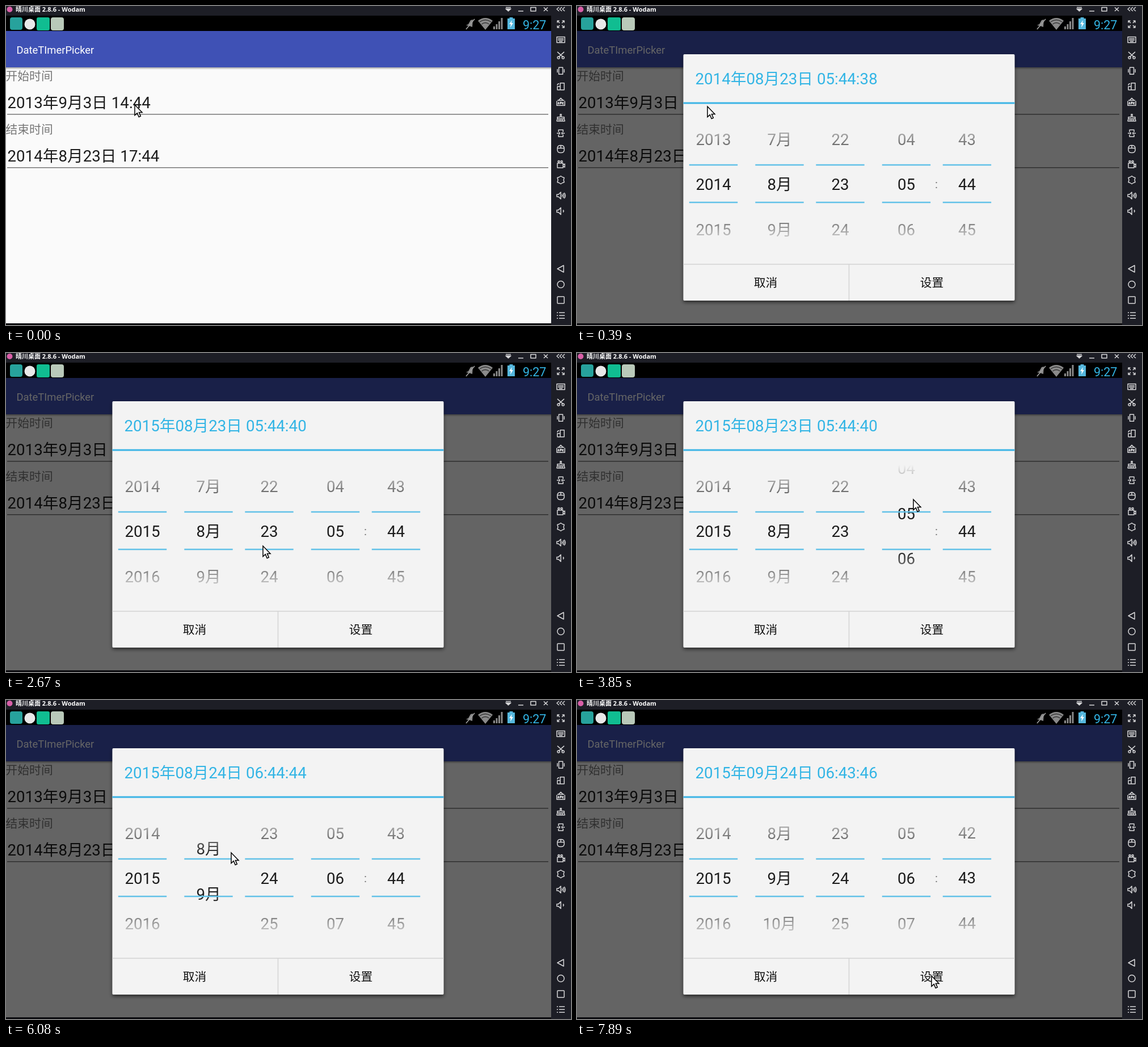
An HTML page for the animation above (8 s loop, 996 by 562 pixels).

```html
<!DOCTYPE html>
<html lang="zh-CN">
<head>
<meta charset="utf-8">
<title>DateTImerPicker</title>
<style>
  html, body { margin: 0; width: 100%; height: 100%; overflow: hidden; background: #1d1e26; }
  svg { display: block; width: 100%; height: 100%; }
  text { font-family: Roboto, "Noto Sans CJK SC", "Noto Sans CJK", sans-serif; white-space: pre; }
  .big { font-size: 27.7px; fill: #1c1c1c; }
  .label { font-size: 20.8px; fill: #777; }
  .button { font-size: 20.8px; fill: #111; text-anchor: middle; }
  .window { font: 700 11px "Open Sans", "Noto Sans CJK SC", "Noto Sans CJK", sans-serif; fill: #fff; }
  .icons { fill: none; stroke: #d6d6d8; stroke-width: 1.5; stroke-linejoin: round; }
  #rows text { text-anchor: middle; }
</style>
</head>
<body>
<svg viewBox="0 0 996 562">
  <defs>
    <linearGradient id="fade" gradientUnits="userSpaceOnUse" x1="0" y1="197" x2="0" y2="424">
      <stop stop-color="#f3f3f3"/>
      <stop offset=".34" stop-color="#f3f3f3" stop-opacity="0"/>
      <stop offset=".66" stop-color="#f3f3f3" stop-opacity="0"/>
      <stop offset="1" stop-color="#f3f3f3"/>
    </linearGradient>
    <linearGradient id="barShadow" x2="0" y2="1">
      <stop stop-opacity=".35"/><stop offset="1" stop-opacity="0"/>
    </linearGradient>
    <filter id="shadow" x="-5%" y="-5%" width="110%" height="112%">
      <feDropShadow dx="0" dy="3" stdDeviation="3" flood-opacity=".6"/>
    </filter>
  </defs>

  <!-- App -->
  <rect y="44" width="961" height="516" fill="#fafafa"/>
  <rect y="44" width="961" height="64" fill="#3f51b5"/>
  <rect y="108" width="961" height="4" fill="url(#barShadow)"/>
  <text x="18.5" y="83.5" font-size="18.4" fill="#fff">DateTImerPicker</text>
  <text class="label" x="-.5" y="131">开始时间</text>
  <text class="big" x="2.5" y="180">2013年9月3日 14:44</text>
  <text class="label" x="-.5" y="224.5">结束时间</text>
  <text class="big" x="2.5" y="274">2014年8月23日 17:44</text>
  <path d="M2 190.7H956M2 284.7H956" stroke="#777" stroke-width="1.4"/>
  <rect id="dim" y="44" width="961" height="516"/>

  <!-- Status bar -->
  <rect y="17" width="961" height="27"/>
  <rect x="7" y="20" width="22" height="22" rx="4" fill="#27a29c"/>
  <circle cx="42" cy="32" r="9.5" fill="#e8e8e8"/>
  <rect x="54" y="20" width="23" height="23" rx="3" fill="#10bd91"/>
  <rect x="79" y="20" width="23" height="23" rx="4" fill="#b9c9b9"/>
  <g fill="#8a8a8a">
    <path d="M811 34L815 32 819 25 823 24 822 37 816 35Z"/>
    <path d="M811 41L826 23" stroke="#a0a0a0" stroke-width="1.6"/>
    <path d="M832 26Q845 16 858 26L845 42Z"/>
    <path d="M835 28Q845 21 855 28M838.5 32Q845 27 851.5 32" fill="none" stroke="#333" stroke-width="1.3"/>
    <path d="M859 41V36H862V41ZM863.5 41V32H866.5V41ZM868 41V27H871V41ZM872.5 41V21H875.5V41Z"/>
  </g>
  <path d="M887.5 20H893.5V22H897V41H884V22H887.5Z" fill="#55b7dd"/>
  <path d="M892 25L887 32H890L889 38 894 30H891Z" fill="#fff"/>
  <text x="911" y="40.5" font-size="21.5" fill="#33b5e5">9:27</text>

  <!-- Window frame -->
  <path d="M0 0H996V562H961V17H0Z" fill="#1d1e26"/>
  <path d="M0 560.5H961" stroke="#0c0c10" stroke-width="3"/>
  <circle cx="6.5" cy="6" r="5" fill="#d95fa8"/>
  <text class="window" x="17" y="10.3">晴川桌面 2.8.6 - Wodam</text>
  <g class="icons">
    <path d="M881 2.5H890"/>
    <path d="M881 5H890L885.5 9Z" fill="#d6d6d8"/>
    <path d="M903 9H912M925 2.5H934V9H925ZM948 2.5L955 9M955 2.5L948 9"/>
    <path d="M975 2L971 5.5 975 9M980 2L976 5.5 980 9M985 2L981 5.5 985 9"/>
  </g>

  <!-- Sidebar icons, drawn around the origin and stacked by the script -->
  <g id="tools" class="icons">
    <path d="M2 -2L6 -6M2.5 -6H6V-2.5M-2 -2L-6 -6M-6 -2.5V-6H-2.5M2 2L6 6M6 2.5V6H2.5M-2 2L-6 6M-2.5 6H-6V2.5"/>
    <path d="M-7 -5H7V5H-7ZM-5 -2H5M-5 .5H5M-3 3H3"/>
    <path d="M-6 -6L4 3M6 -6L-4 3M-6 4a2 2 0 1 0 4 0a2 2 0 1 0 -4 0M2 4a2 2 0 1 0 4 0a2 2 0 1 0 -4 0"/>
    <path d="M-3.5 -6H3.5V6H-3.5ZM-6 -3V3M6 -3V3"/>
    <path d="M-1 -6H6V6H-1ZM-1 0H-6V6H-1M-6 -2Q-6 -5 -3 -5"/>
    <path d="M-4 -3L0 -7 4 -3M-6 -3H6M-7 -2V6H7V-2M-5 4L-4 0 -3 4M-1 4V0H1V2H-1M3 0V4M5 0L3 2 5 4"/>
    <path d="M-1 -6H1V-1H6V2H-6V-1H-1ZM-6 2L-7 6H7L6 2M-3 3V6M0 3V6M3 3V6"/>
    <path d="M-4 -2V-6H4V-2M-4 2V6H4V2M-7 0H-2M2 0H7M-2 -2V2M2 -2V2"/>
    <path d="M-6 -1Q-6 -6 0 -6T6 -1V2Q6 7 0 7T-6 2ZM-6 -1H6M0 -6V-1"/>
    <path d="M-6 -2H4V6H-6ZM4 1L7 -1V5L4 3M-5 -5a1.5 1.5 0 1 0 3 0a1.5 1.5 0 1 0 -3 0M0 -5a1.5 1.5 0 1 0 3 0a1.5 1.5 0 1 0 -3 0"/>
    <path d="M-3 -5L0 -7 3 -5 6 -4 5 0 6 4 3 5 0 7 -3 5 -6 4 -5 0 -6 -4Z"/>
    <path d="M-7 -2H-4L0 -6V6L-4 2H-7ZM2 -2Q4 0 2 2M4 -4Q7 0 4 4M6 -5Q10 0 6 5"/>
    <path d="M-7 -2H-4L0 -6V6L-4 2H-7ZM4 -2Q6 0 4 2"/>
  </g>
  <g id="keys" class="icons">
    <path d="M5 -6V6L-6 0Z"/>
    <circle r="6"/>
    <rect x="-6" y="-6" width="12" height="12" rx="1"/>
    <path d="M-3 -5H7M-3 0H7M-3 5H7M-7 -5H-5M-7 0H-5M-7 5H-5"/>
  </g>

  <!-- Dialog -->
  <g id="dialog">
    <rect x="187.5" y="85" width="584" height="434" rx="2" fill="#f3f3f3" filter="url(#shadow)"/>
    <g id="rows"></g>
    <rect x="190" y="150" width="578" height="300" fill="url(#fade)"/>
    <text id="heading" class="big" x="208.5" y="138" style="fill:#33b5e5"></text>
    <rect x="187.5" y="169.5" width="584" height="3" fill="#3cb4e5"/>
    <path id="dividers" stroke="#62c1e8" stroke-width="2.4"/>
    <text x="631" y="321" font-size="21" fill="#777">:</text>
    <path d="M187.5 455H771.5M479.5 455V519" stroke="#d2d2d2" stroke-width="1.4"/>
    <text class="button" x="332.5" y="495">取消</text>
    <text class="button" x="625.5" y="495">设置</text>
  </g>

  <path id="pointer" d="M0 0V18.5L4.3 14.6 7.2 21.5 10.3 20.2 7.4 13.4H13Z"
        fill="#fff" stroke="#000" stroke-width="1.5"/>
</svg>

<script>
const $ = id => document.getElementById(id);
const pad = n => String(n).padStart(2, '0');
const clamp = u => Math.min(1, Math.max(0, u));

function stackIcons(group, top) {
  [...group.children].forEach((icon, i) =>
    icon.setAttribute('transform', `translate(978 ${top + 27.45 * i})`));
}
stackIcons($('tools'), 32);
stackIcons($('keys'), 463);

const loop = 8000, stepLength = 131.5;

// Pointer key points: step, x, y
const pointerPath = [
  [1, 227, 174], [3, 230, 177], [5, 255, 268], [6, 245, 308], [10, 252, 215], [13, 309, 259],
  [17, 379, 341], [20, 453, 340], [25, 642, 392], [28, 600, 306], [29, 593, 258], [31, 588, 205],
  [34, 466, 350], [39, 470, 210], [41, 345, 338], [46, 397, 269], [48, 400, 240],
  [51, 682, 240], [56, 693, 433], [59, 625, 486],
];
function pointerAt(step) {
  const next = pointerPath.findIndex(point => point[0] > step);
  if (next <= 0) return pointerPath.at(next).slice(1);
  const [t0, x0, y0] = pointerPath[next - 1], [t1, x1, y1] = pointerPath[next];
  const f = (step - t0) / (t1 - t0);
  return [x0 + (x1 - x0) * f, y0 + (y1 - y0) * f];
}

// Each wheel is flicked once, by one row, beginning at step `flick`
const wheels = [
  { x: 240.5, value: 2014, flick: 7, turn: 1, format: String },
  { x: 357, value: 8, flick: 42.2, turn: 1, format: n => n + '月' },
  { x: 464, value: 23, flick: 35.5, turn: 1, format: pad },
  { x: 580.5, value: 5, flick: 27, turn: 1, format: pad },
  { x: 687.5, value: 44, flick: 50.5, turn: -1, format: pad },
];
const rowHeight = 79.5;
const seconds = [38, 40, 43, 44, 45, 46];
const spin = u => 1 - (1 - clamp(u)) ** 2.5;

for (const wheel of wheels) {
  wheel.rows = [-1, 0, 1].map(offset => {
    const text = document.createElementNS('http://www.w3.org/2000/svg', 'text');
    text.setAttribute('class', 'big');
    text.setAttribute('x', wheel.x);
    $('rows').append(text);
    return { offset, text };
  });
}
$('dividers').setAttribute('d', wheels.flatMap(({ x }) =>
  [280, 346].map(y => `M${x - 42.7} ${y}h85.4`)).join(''));

function drawDialog(step) {
  const entry = clamp(.71 + .29 * (step - 1));
  const scale = .907 + .093 * entry;
  const dim = clamp(step / 3) ** 1.32 * .6;
  $('dim').setAttribute('opacity', step ? dim : 0);
  $('dialog').setAttribute('opacity', step ? entry : 0);
  $('dialog').setAttribute('transform', `translate(479.5 302) scale(${scale}) translate(-479.5 -302)`);
}

function drawWheels(step) {
  let changes = 0;
  const [year, month, day, hour, minute] = wheels.map(({ value, flick, turn, format, rows }) => {
    const turned = spin((step - flick) / 11);
    // The next value is taken after two thirds of a row
    const changed = Math.floor(turned + .33);
    const current = value + turn * changed;
    changes += changed;
    for (const { offset, text } of rows) {
      text.textContent = format(current + offset);
      text.setAttribute('y', 324 + (offset + turn * (changed - turned)) * rowHeight);
    }
    return pad(current);
  });
  $('heading').textContent = `${year}年${month}月${day}日 ${hour}:${minute}:${seconds[changes]}`;
}

function draw() {
  const step = Math.floor((performance.now() % loop + 5) / stepLength);
  $('pointer').setAttribute('transform', `translate(${pointerAt(step)})`);
  drawDialog(step);
  drawWheels(step);
  requestAnimationFrame(draw);
}
draw();
</script>
</body>
</html>
```
